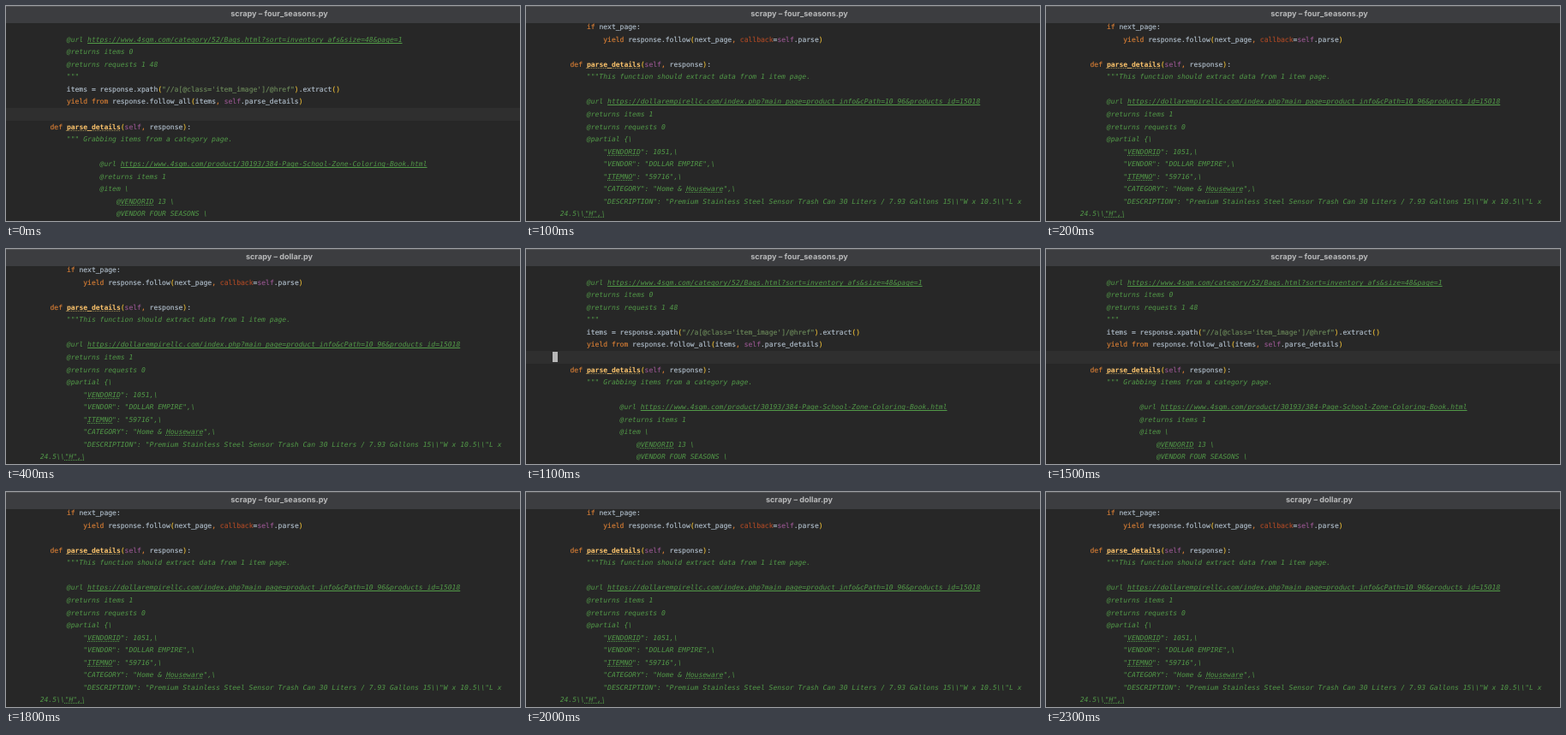
Recreate the animation shown at these times as an HTML page. Size 600x251 px, loop 2.4 s.

```html
<!DOCTYPE html>
<html lang="en">
<head>
<meta charset="utf-8">
<title>Editor tabs</title>
<style>
html, body { margin: 0; width: 100%; height: 100%; overflow: hidden; background: #272727; }
body { position: relative; text-rendering: geometricPrecision; }
#bar {
  position: absolute; top: 0; left: 0; width: 100%; height: 20px; box-sizing: border-box;
  background: #3c3d40; border-top: 1px solid #525355;
}
#title {
  position: absolute; top: 1px; left: 0; width: 638px; text-align: center;
  font: bold 9.15px/18px Inter, sans-serif; color: #b8b9ba;
}
pre {
  position: absolute; left: 32.2px; top: 18.2px; margin: 0;
  font: 8.04px/14.54px "DejaVu Sans Mono", monospace; color: #b0becb;
  font-variant-ligatures: none; -webkit-text-stroke: .15px;
}
#row { position: absolute; top: 119px; left: 0; width: 100%; height: 15px; background: #2f2f2f; }
#caret { position: absolute; top: 120px; left: 31px; width: 6px; height: 12px; background: #b8b8b8; }
i { color: #529a48; -webkit-text-stroke: 0; }
u { text-decoration: underline .7px; text-underline-offset: 1px; text-decoration-skip-ink: none; }
b { color: #ffc66d; -webkit-text-stroke: 0; }
s { text-decoration: underline dotted 1px #a08a50; text-underline-offset: 1px; text-decoration-skip-ink: none; }
i s { text-decoration-color: #529a48; }
.key { color: #d57d35; }
.self { color: #94558d; }
.arg { color: #aa4926; }
.str { color: #6a8759; }
.br { color: #e8ba36; }
.wrap { margin-left: 7.5px; }
</style>
</head>
<body>
<div id="seasons">
<div id="row"></div>
<div id="caret"></div>
<pre>
&#8203;
<i>        @url <u>https://www.4sgm.com/category/52/Bags.html?sort=inventory_afs&amp;size=48&amp;page=1</u>
        @returns items 0
        @returns requests 1 48
        """</i>
        items = response.xpath<span class="br">(</span><span class="str">"//a[@class='item_image']/@href"</span><span class="br">)</span>.extract<span class="br">()</span>
        <span class="key">yield from</span> response.follow_all<span class="br">(</span>items<span class="key">,</span> <span class="self">self</span>.parse_details<span class="br">)</span>

    <span class="key">def</span> <b><s>parse_details</s></b><span class="br">(</span><span class="self">self</span><span class="key">,</span> response<span class="br">)</span>:
<i>        """ Grabbing items from a category page.

                @url <u>https://www.4sgm.com/product/30193/384-Page-School-Zone-Coloring-Book.html</u>
                @returns items 1
                @item \
                    @<s>VENDORID</s> 13 \
                    @VENDOR FOUR SEASONS \</i>
</pre>
</div>
<div id="dollar">
<pre>
        <span class="key">if</span> next_page:
            <span class="key">yield</span> response.follow<span class="br">(</span>next_page<span class="key">,</span> <span class="arg">callback</span>=<span class="self">self</span>.parse<span class="br">)</span>

    <span class="key">def</span> <b><s>parse_details</s></b><span class="br">(</span><span class="self">self</span><span class="key">,</span> response<span class="br">)</span>:
<i>        """This function should extract data from 1 item page.

        @url <u>https://dollarempirellc.com/index.php?main_page=product_info&amp;cPath=10_96&amp;products_id=15018</u>
        @returns items 1
        @returns requests 0
        @partial {\
            "<s>VENDORID</s>": 1051,\
            "VENDOR": "DOLLAR EMPIRE",\
            "<s>ITEMNO</s>": "59716",\
            "CATEGORY": "Home &amp; <s>Houseware</s>",\
            "DESCRIPTION": "Premium Stainless Steel Sensor Trash Can 30 Liters / 7.93 Gallons 15\\"W x 10.5\\"L x
<span class="wrap">24.5\\<s>"H",\</s></span></i>
</pre>
</div>
<div id="bar"></div>
<div id="title"></div>
<script>
const LOOP = 2400;
const byId = id => document.getElementById(id);
const show = (id, on) => { byId(id).style.display = on ? "block" : "none"; };
const within = (t, from, to) => t >= from && t < to;

function draw(now) {
  const t = now % LOOP;
  const dollar = within(t, 100, 1100) || t >= 1800;
  // The window title follows a tab switch with a short delay.
  const dollarTitle = within(t, 300, 1100) || t >= 1900;
  show("dollar", dollar);
  show("seasons", !dollar);
  show("caret", within(t, 1100, 1200));
  byId("title").textContent = `scrapy – ${dollarTitle ? "dollar" : "four_seasons"}.py`;
}

const start = performance.now();
function tick() {
  draw(performance.now() - start);
  requestAnimationFrame(tick);
}
tick();
</script>
</body>
</html>
```
